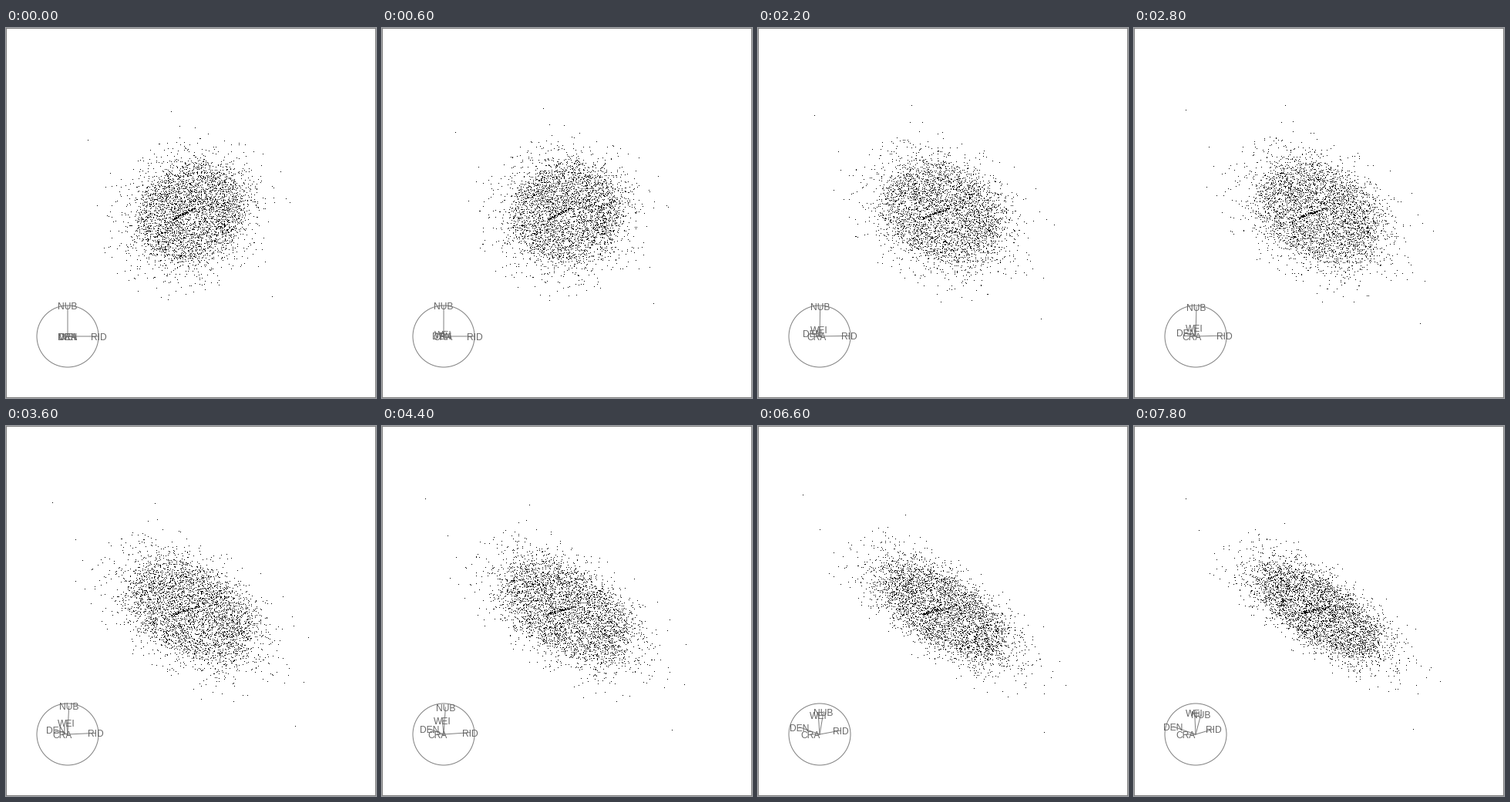
Animation, 480 px wide and 480 px high, one loop 8 s. Source, as a matplotlib script:

```python
import numpy as np
import matplotlib.pyplot as plt
from matplotlib.animation import FuncAnimation
from matplotlib.patches import Circle

SIZE, FRAMES, STEP = 480, 40, 200
MID = SIZE / 2
HUB, RADIUS = np.array([80, 400]), 40

# A 5-D tour: the plane turns along a geodesic with two principal angles.
SPEED = np.array([0.01735, 0.02877])
PHI = np.radians(50.2)
BASIS = np.array([[np.cos(PHI), np.sin(PHI)], [-np.sin(PHI), np.cos(PHI)]])

# Each axis: name, part in the first plane, part turning into view.
AXES = [("RID", BASIS[:, 0], (0, 0)),
        ("NUB", BASIS[:, 1], (0, 0)),
        ("CRA", (0, 0), (-0.337, 0.278)),
        ("WEI", (0, 0), (0.832, 0.532)),
        ("DEN", (0, 0), (-0.441, 0.800))]
NAMES, AXIS_START, AXIS_TURN = (np.array(part) for part in zip(*AXES))


def project(start, turn, k):
    """Plane coordinates (y up) of points after k steps of the tour."""
    a = SPEED * k
    return (start * np.cos(a) + turn * np.sin(a)) @ BASIS


def from_ends(first, last):
    """Tour coordinates of points known by their first and last screen place."""
    flip = np.array([1, -1])
    p, q = ((np.asarray(v) - MID) * flip @ BASIS.T for v in (first, last))
    a = SPEED * (FRAMES - 1)
    return np.hstack([p, (q - p * np.cos(a)) / np.sin(a)])


def cloud(rng, count):
    """Gaussian cloud in (start1, start2, turn1, turn2) with a hollow core."""
    half = np.array([[804, -183, -1020, -200],
                     [0, 644, 0, 1250],
                     [0, 0, 700, -190],
                     [0, 0, 0, 1075]])
    z = rng.standard_normal((count, 4))
    r = np.linalg.norm(z, axis=1, keepdims=True)
    z *= np.where(r < 2, 2 - (2 - r) * 0.4, r) / r
    z = z[r[:, 0] < 3.7]
    return 0.95 * z @ np.linalg.cholesky(half + half.T).T


def streak(rng, count):
    """The small dense bar near the middle."""
    s, w = rng.uniform(-1, 1, (2, count, 1))
    first = [231, 241] + s * [15, -8] + w * [0.6, 1]
    last = [236, 238.5] + s * [19, -4] + w * [0.4, 1.6]
    return from_ends(first, last)


rng = np.random.default_rng(11)
far = from_ends([(106, 145), (345, 348), (363, 221), (214, 108)],
                [(67, 94), (362, 393), (385, 313), (195, 126)])
points = np.vstack([cloud(rng, 3760), streak(rng, 99), far])

fig = plt.figure(figsize=(4.8, 4.8), dpi=100, facecolor="white")
px = 72 / fig.dpi
ax = fig.add_axes([0, 0, 1, 1])
ax.set(xlim=(0, SIZE), ylim=(SIZE, 0))
ax.axis("off")

blank = np.full((SIZE, SIZE, 3), 255, np.uint8)
blank[[0, -1]] = blank[:, [0, -1]] = 127
dots = fig.figimage(blank, origin="upper", zorder=-1)

ax.add_patch(Circle(HUB, RADIUS, fill=False, ec="#808080", lw=px))
spokes = [ax.plot([], [], color="#808080", lw=px, snap=False)[0] for _ in NAMES]
labels = [ax.text(0, 0, n, ha="center", va="baseline", color="#666666",
                  family="Liberation Sans", size=12 * px) for n in NAMES]


def draw(k):
    p = project(points[:, :2], points[:, 2:], k)
    x = np.floor(MID + p[:, 0]).astype(int)
    y = np.floor(MID - p[:, 1]).astype(int)
    view = blank.copy()
    view[y, x] = 0
    dots.set_data(view)

    tips = HUB + RADIUS * project(AXIS_START, AXIS_TURN, k) * [1, -1]
    for spoke, label, (tx, ty) in zip(spokes, labels, tips):
        spoke.set_data([HUB[0], tx], [HUB[1], ty])
        label.set_position((tx, ty + 5))
    return [dots, *spokes, *labels]


anim = FuncAnimation(fig, draw, frames=FRAMES, interval=STEP, repeat=True, repeat_delay=0)
plt.show()
```
